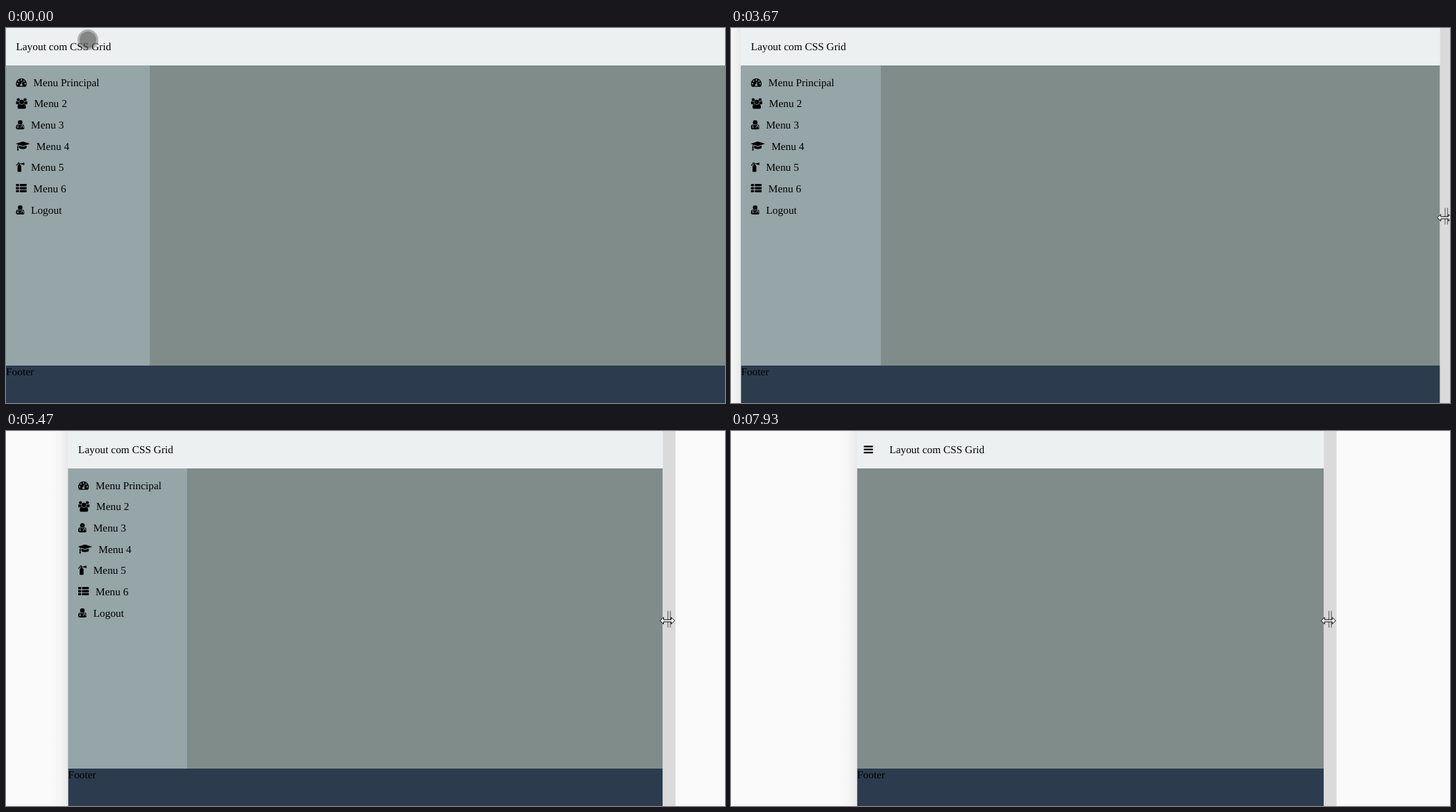
Animation, 1036 px wide and 541 px high, one loop 8 s. Source, as an HTML page:

```html
<!DOCTYPE html>
<html lang="pt">
<head>
<meta charset="utf-8">
<title>Layout com CSS Grid</title>
<style>
  html, body { margin: 0; width: 100%; height: 100%; overflow: hidden; background: #fafafa; }
  svg { display: block; }
  text { font: 15.36px "Liberation Serif", "Times New Roman", serif; text-rendering: geometricPrecision; }
  .hole { fill: #96a5a8; }
  .line { fill: none; stroke: #96a5a8; stroke-width: 110; }
  .cursor { fill: #fff; stroke: #000; }
</style>
</head>
<body>
<svg width="1036" height="541" viewBox="0 0 1036 541">
  <defs>
    <linearGradient id="shade">
      <stop offset="0" stop-opacity="0"/>
      <stop offset=".5" stop-opacity=".018"/>
      <stop offset="1" stop-opacity=".07"/>
    </linearGradient>
  </defs>
  <g id="page">
    <rect x="-26" width="26" height="541" fill="url(#shade)"/>
    <rect class="full" height="54" fill="#ecf0f1"/>
    <rect class="full" y="54" height="433" fill="#7f8c8a"/>
    <rect class="full" y="487" height="54" fill="#2c3c4e"/>
    <g id="wide">
      <rect id="side" y="54" height="433" fill="#96a5a8"/>
      <g id="menu"></g>
    </g>
    <g id="burger"></g>
    <text id="title" y="32">Layout com CSS Grid</text>
    <text y="501">Footer</text>
  </g>
  <g id="handle">
    <rect width="18.3" height="541" fill="#dadada"/>
    <path d="M7.3 259.5v24M10.9 259.5v24" stroke="#666" stroke-width="1.2"/>
  </g>
  <path id="resize" class="cursor" d="M-10.5 0l5-4.8v3.3h11v-3.3l5 4.8-5 4.8v-3.3h-11v3.3z"/>
  <path id="arrow" class="cursor" d="M.5.5v15.4l3.6-3.4 2.4 5.4 2.2-1-2.4-5.2h4.9z"/>
  <g id="touch">
    <circle r="15" fill="#555" fill-opacity=".4"/>
    <circle r="12" fill="#555" fill-opacity=".47"/>
  </g>
</svg>
<script>
const $ = id => document.getElementById(id);
const UNIT = 15.36 / 1792, PAD = 14.4, STEP = 200 / 3;

const dot = (x, y, r, cls = '') => `<circle class="${cls}" cx="${x}" cy="${y}" r="${r}"/>`;
const bar = (x, y, w, h, r) => `<rect x="${x}" y="${y}" width="${w}" height="${h}" rx="${r}"/>`;
const path = (d, cls = '') => `<path class="${cls}" d="${d}"/>`;
const icon = (shape, x, base) => `<g transform="translate(${x} ${base - 1536 * UNIT}) scale(${UNIT})">${shape}</g>`;

// Shoulders shared by the people icons, relative to the right bottom corner
const torso = 'q0 120-73 189.5t-194 69.5h-874q-121 0-194-69.5t-73-189.5q0-53 3.5-103.5t14-109 26.5-108.5 43-97.5 62-81 85.5-53.5 111.5-20q10 0 43 21.5t73 48 107 48 135 21.5 135-21.5 107-48 73-48 43-21.5q61 0 111.5 20t85.5 53.5 62 81 43 97.5 26.5 108.5 14 109 3.5 103.5z';

const gauge = path('M1792 1152A896 896 0 1 0 141 1635q19 29 54 29h1402q35 0 54-29A896 896 0 0 0 1792 1152z')
  + [[256, 1152], [448, 704], [896, 512], [1344, 704], [1536, 1152]].map(([x, y]) => dot(x, y, 128, 'hole')).join('')
  + dot(896, 1360, 192, 'hole') + path('M900 1340L1042 785', 'line');

const group = path('M593 896q-162 5-265 128h-134q-82 0-138-40.5t-56-118.5q0-353 124-353 6 0 43.5 21t97.5 42.5 119 21.5q67 0 133-23-5 37-5 66 0 139 81 256z')
  + path('M1920 865q0 78-56 118.5t-138 40.5h-134q-103-123-265-128 81-117 81-256 0-29-5-66 66 23 133 23 59 0 119-21.5t97.5-42.5 43.5-21q124 0 124 353z')
  + path('M1664 1533' + torso) + dot(384, 256, 256) + dot(960, 640, 384) + dot(1536, 256, 256);

const medic = path('M1408 1405' + torso) + dot(704, 512, 384)
  + path('M320 900v300M1088 900v180M848 1430v-130q0-210 230-210t230 210v130', 'line')
  + dot(320, 1344, 130, 'hole') + dot(320, 1344, 55);

const cap = path('M1774 836l18 316q4 69-82 128t-235 93.5-323 34.5-323-34.5-235-93.5-82-128l18-316 574 181q22 7 48 7t48-7z')
  + path('M2304 512q0 23-22 31l-1120 352q-4 1-10 1t-10-1l-652-206q-43 34-71 111.5t-34 178.5q63 36 63 109 0 69-58 107l58 433q2 14-8 25-9 11-24 11h-192q-15 0-24-11-10-11-8-25l58-433q-58-38-58-107 0-73 65-111 11-207 98-330l-333-104q-22-8-22-31t22-31l1120-352q4-1 10-1t10 1l1120 352q22 8 22 31z');

const extinguisher = path('M1408 160v320q0 16-12 25-8 7-20 7-4 0-7-1l-448-96q-11-2-18-11t-7-20h-256v102q111 23 183.5 111t72.5 203v800q0 26-19 45t-45 19h-512q-26 0-45-19t-19-45v-800q0-106 62.5-190.5t161.5-114.5v-111h-32q-59 0-115 23.5t-91.5 53-66 66.5-40.5 53.5-14 24.5q-17 35-57 35-16 0-29-7-23-12-31.5-37t3.5-49q5-10 14.5-26t37.5-53.5 60.5-70 85-67 108.5-52.5q-25-42-25-86 0-66 47-113t113-47 113 47 47 113q0 33-14 64h302q0-11 7-20t18-11l448-96q3-1 7-1 12 0 20 7 12 9 12 25z')
  + dot(448, 192, 64, 'hole');

const list = [128, 640, 1152].map(y => bar(0, y, 512, 384, 96) + bar(640, y, 1152, 384, 96)).join('');
const burger = [256, 768, 1280].map(y => bar(0, y, 1536, 256, 64)).join('');

const items = [
  ['Menu Principal', gauge, 1792], ['Menu 2', group, 1920], ['Menu 3', medic, 1408],
  ['Menu 4', cap, 2304], ['Menu 5', extinguisher, 1408], ['Menu 6', list, 1792], ['Logout', medic, 1408]
];
$('menu').innerHTML = items.map(([label, shape, width], i) => {
  const base = 83.7 + i * 30.68;
  return icon(shape, PAD, base) + `<text x="${PAD + width * UNIT + 9.6}" y="${base}">${label}</text>`;
}).join('');
$('burger').innerHTML = icon(burger, 9.6, 32.2);

// Keys are [step, value, ...]
const margin = [[46, 0], [55, 14.4], [59, 26], [72, 65], [85, 97], [92, 127.5], [98, 147.5],
  [105, 169.7], [106, 170.6], [108, 170.6], [119, 181.8]];
const pointer = [[26, 1029.5, 280], [29, 1010, 270], [31, 1015, 264], [33, 1031, 267]];

function at(keys, n) {
  if (n <= keys[0][0]) return keys[0].slice(1);
  const i = keys.findIndex(k => k[0] >= n);
  if (i < 0) return keys[keys.length - 1].slice(1);
  const a = keys[i - 1], b = keys[i], u = (n - a[0]) / (b[0] - a[0]);
  return a.slice(1).map((v, j) => v + (b[j + 1] - v) * u);
}
const move = (id, x, y = 0) => $(id).setAttribute('transform', `translate(${x} ${y})`);
const show = (id, on) => $(id).setAttribute('display', on ? 'inline' : 'none');

function draw(ms) {
  const n = Math.floor((ms % 8000 + 5) / STEP);
  const [left] = at(margin, n), width = 1036 - 2 * left, right = 1036 - left;
  const narrow = width < 768 * .96;

  move('page', left);
  document.querySelectorAll('.full').forEach(r => r.setAttribute('width', width));
  $('side').setAttribute('width', width * .2);
  show('wide', !narrow);
  show('burger', narrow);
  $('title').setAttribute('x', narrow ? 46.5 : PAD);
  move('handle', right);

  show('touch', n < 2);
  move('touch', ...(n < 1 ? [118, 17] : [661, 93]));
  show('arrow', n >= 26 && n < 34);
  move('arrow', ...at(pointer, n));
  show('resize', n >= 34);
  move('resize', right + 6.6, 273.7);
}

const start = performance.now();
function tick() {
  draw(performance.now() - start);
  requestAnimationFrame(tick);
}
tick();
</script>
</body>
</html>
```
